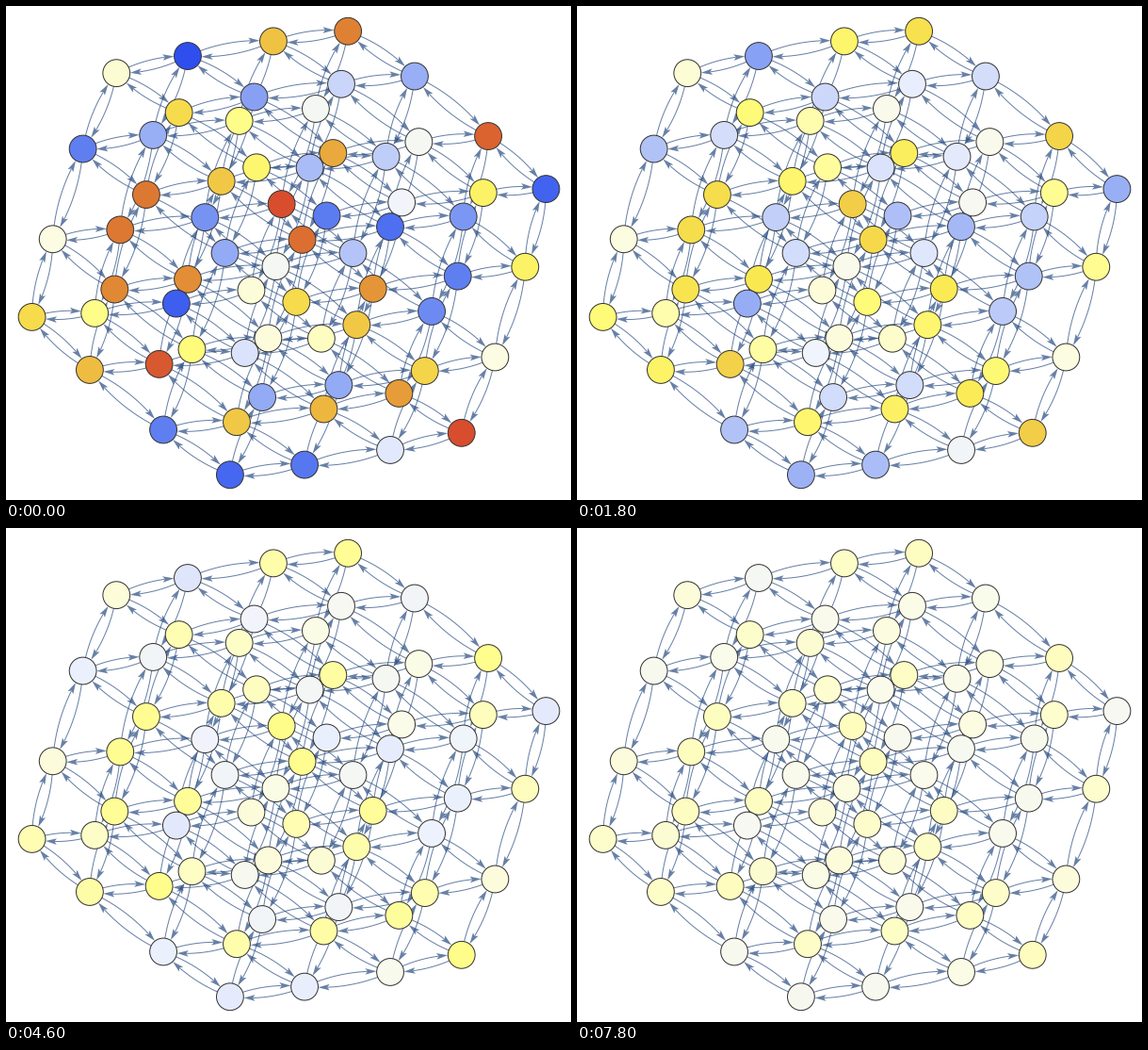
Write a matplotlib script that moves like this. It is 600 px wide and 524 px high and loops after 8 s.

```python
import itertools

import matplotlib.pyplot as plt
import numpy as np
from matplotlib.animation import FuncAnimation
from matplotlib.collections import LineCollection, PatchCollection, PolyCollection
from matplotlib.colors import LinearSegmentedColormap
from matplotlib.patches import Circle

W, H, DPI = 600, 524, 100
FRAMES, INTERVAL = 40, 200
PX = 72 / DPI
N = 4
RADIUS = 14.4
BULGE = 0.066
MEAN, DECAY = 0.523, 18.6
EDGE = (0.15, 0.29, 0.5, 0.7)

# Lattice layout: a projected cube whose cells shrink towards the rim.
CENTER = np.array([300.5, 262])
AXES = np.array([(95.4, -14.2), (87.3, 63.5), (-36.4, 106.2)])
BEND = np.array([
    [(-4.52, 0.42), (-1.46, -0.08), (-0.96, 0.58)],
    [(-1.37, 0.21), (-4.02, -3.87), (-1.29, -0.96)],
    [(0.79, -1.46), (0.12, -1.46), (1.02, -4.76)],
])
TWIST = np.array([0.96, -1.19])

# Starting temperature of each node in percent, one row per lattice plane.
START = np.array([
    [54, 0, 81, 91, 77, 20, 32, 23, 69, 85, 46, 94, 11, 43, 71, 5],
    [12, 23, 65, 46, 92, 80, 26, 30, 22, 93, 8, 18, 77, 88, 12, 71],
    [51, 92, 17, 96, 90, 89, 46, 28, 67, 52, 80, 15, 22, 22, 78, 51],
    [77, 65, 4, 53, 82, 95, 36, 57, 12, 80, 83, 87, 6, 10, 38, 96],
]).ravel() / 100

TEMPERATURE = LinearSegmentedColormap.from_list("temperature", [
    "#2e4eee", "#4f71f0", "#7491f2", "#a4b8f6", "#d1dbfb", "#eff3fd",
    "#fbfce8", "#fefdba", "#fffd7d", "#f9e850", "#ecb43e", "#de7d32",
    "#d0222a",
], N=1024)


def layout():
    grid = np.array(list(itertools.product(range(N), repeat=3)))[:, ::-1]
    q = grid - (N - 1) / 2
    bend = np.einsum("ni,nj,ijk->nk", q, q ** 2, BEND)
    return CENTER + q @ AXES + bend + q.prod(axis=1)[:, None] * TWIST


def lattice_edges():
    for i, step in itertools.product(range(N ** 3), (1, N, N * N)):
        if i // step % N < N - 1:
            yield i, i + step
            yield i + step, i


def arc(p, q):
    """Curve from p to q, bowed to the left of travel."""
    d = q - p
    ctrl = (p + q) / 2 + 2 * BULGE * np.array([d[1], -d[0]])
    t = np.linspace(0, 1, 241)[:, None]
    return (1 - t) ** 2 * p + 2 * t * (1 - t) * ctrl + t ** 2 * q


def arrow(p, q, length=12, half=3.3, notch=9.5):
    """Shaft and barbed head of an arrow ending on the rim of q."""
    path = arc(p, q)
    path = path[np.hypot(*(path - q).T) >= RADIUS]
    tip = path[-1]
    gap = np.hypot(*(path - tip).T)
    u = tip - path[np.argmin(abs(gap - notch))]
    u /= np.hypot(*u)
    n = np.array([-u[1], u[0]])
    back = tip - length * u
    head = [tip, back + half * n, tip - notch * u, back - half * n]
    return path[gap >= notch], head


def colors(frame):
    return TEMPERATURE(MEAN + (START - MEAN) * np.exp(-frame / DECAY))


fig = plt.figure(figsize=(W / DPI, H / DPI), dpi=DPI, facecolor="white")
ax = fig.add_axes([0, 0, 1, 1])
ax.set(xlim=(0, W), ylim=(H, 0))
ax.axis("off")

nodes = layout()
shafts, heads = zip(*(arrow(nodes[i], nodes[j]) for i, j in lattice_edges()))
ax.add_collection(LineCollection(shafts, colors=[EDGE], linewidths=PX, zorder=1))
ax.add_collection(PolyCollection(heads, facecolors=[EDGE], linewidths=0, zorder=2))
discs = PatchCollection([Circle(p, RADIUS) for p in nodes],
                        edgecolors="#333333", linewidths=PX, zorder=3)
discs.set_facecolor(colors(0))
ax.add_collection(discs)


def update(frame):
    discs.set_facecolor(colors(frame))
    return [discs]


anim = FuncAnimation(fig, update, frames=FRAMES, interval=INTERVAL,
                     repeat=True, repeat_delay=0, blit=False)
plt.show()
```
